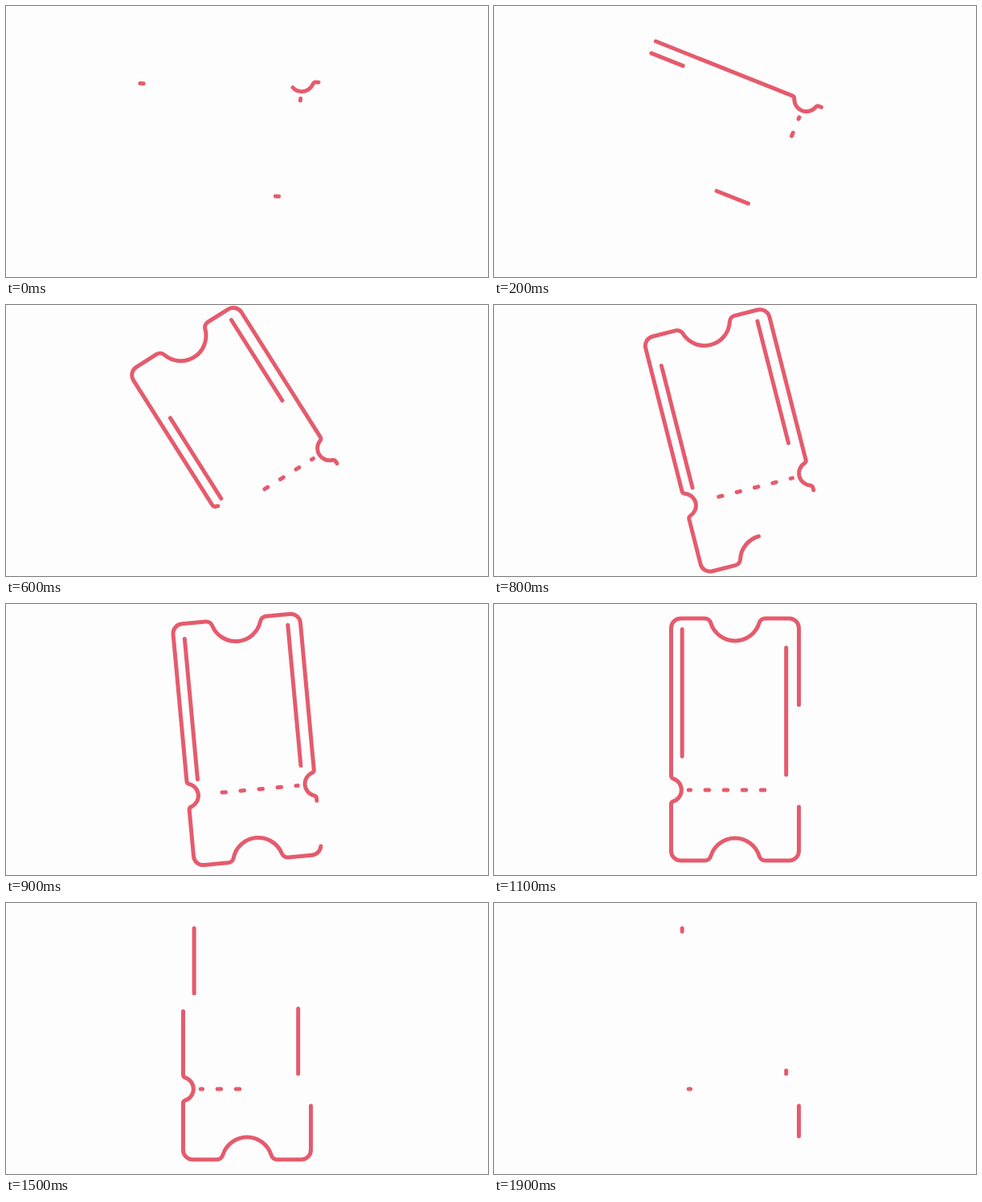
An HTML page for the animation above (2 s loop, 600x338 px).

```html
<!DOCTYPE html>
<html lang="en">
<head>
<meta charset="utf-8">
<title>Ticket loader</title>
<style>
  html, body { margin: 0; width: 100%; height: 100%; overflow: hidden; background: #fdfdfe; }
  svg { display: block; width: 100%; height: 100%; }
</style>
</head>
<body>
<svg viewBox="0 0 600 338">
  <g id="ticket" fill="none" stroke="#e55b6d" stroke-width="5" stroke-linecap="round" stroke-linejoin="round">
    <path id="outline" d="M379.5 253V308a12 12 0 0 1-12 12H337.8
      a8 8 0 0 1-7.7-5.7a31.5 31.5 0 0 0-60.2 0a8 8 0 0 1-7.7 5.7H232.5
      a12 12 0 0 1-12-12V250
      a4 4 0 0 1 2.7-3.8a15 15 0 0 0 0-28.4a4 4 0 0 1-2.7-3.8V30
      a12 12 0 0 1 12-12H262.2
      a8 8 0 0 1 7.7 5.7a31.5 31.5 0 0 0 60.2 0a8 8 0 0 1 7.7-5.7H367.5
      a12 12 0 0 1 12 12V214
      a4 4 0 0 1-2.7 3.8a15 15 0 0 0 0 28.4a4 4 0 0 1 2.7 3.8V253"/>
    <path id="left"/>
    <path id="right"/>
    <path id="tear" stroke-dasharray="4.5 18.58" stroke-dashoffset="2.25"/>
  </g>
</svg>
<script>
const LOOP = 2000, STEP = 100;
const LEAD = 1000 / 24;          // the loop opens slightly into the motion
const TURN = 1000 - LEAD;        // drawing ends, erasing begins
const TOP = 31.5, BOTTOM = 213;  // side lines
const TEAR = [242.3, 357.7];     // perforation

const [ticket, outline, left, right, tear] =
  ["ticket", "outline", "left", "right", "tear"].map(id => document.getElementById(id));
const total = outline.getTotalLength();
const clamp = (v, max) => Math.max(0, Math.min(max, v));

function trimOutline(part, fromEnd) {
  const len = total * part;
  outline.setAttribute("stroke-dasharray", `${len} ${total + 10}`);
  outline.setAttribute("stroke-dashoffset", fromEnd ? len - total : 0);
}

function render(t) {
  const drawing = t < TURN;
  const part = drawing ? (t + LEAD) / 1000 : clamp(1 - (t - TURN) / 980, 1);
  const side = clamp(drawing ? 4.2 + 0.191 * t : 4 + 0.193 * (1900 - t), BOTTOM - TOP);
  const down = `M0 ${TOP}v${side}`, up = `M0 ${BOTTOM}v${-side}`;
  const run = (TEAR[1] - TEAR[0]) * part;

  const angle = drawing ? -90 * (1 - part) : 0;
  ticket.setAttribute("transform", `rotate(${angle} 300 169)`);
  trimOutline(part, drawing);

  left.setAttribute("transform", "translate(234.2 0)");
  right.setAttribute("transform", "translate(363.7 0)");
  left.setAttribute("d", drawing ? up : down);
  right.setAttribute("d", drawing ? down : up);
  tear.setAttribute("d", drawing ? `M${TEAR[1]} 232h${-run}` : `M${TEAR[0]} 232h${run}`);
}

const start = performance.now();
function tick() {
  const t = (performance.now() - start) % LOOP;
  render(Math.floor(t / STEP) * STEP);
  requestAnimationFrame(tick);
}
tick();
</script>
</body>
</html>
```
